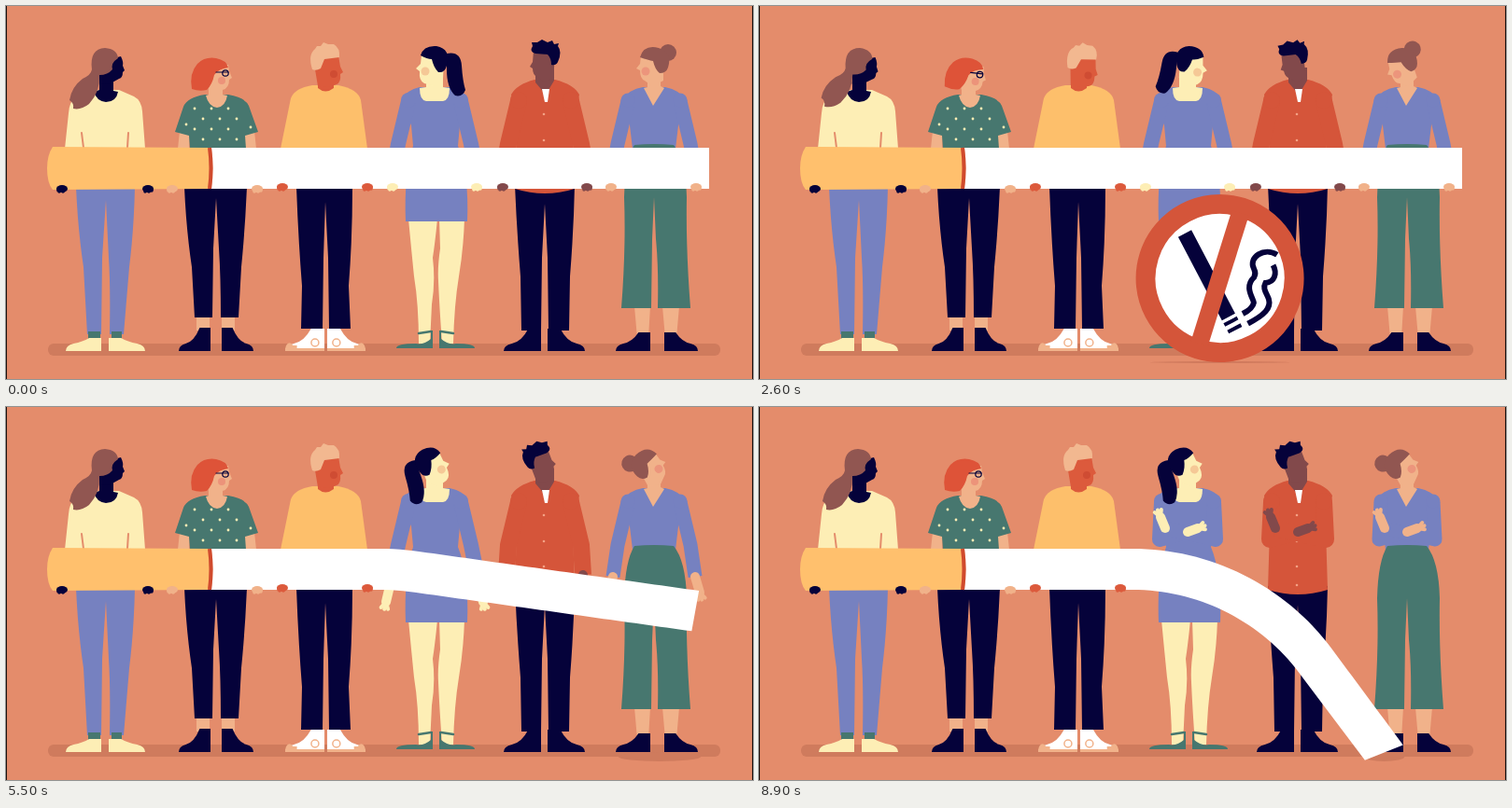
Animation of 800 by 400 pixels, one loop 9 s. Source, as an HTML page:

```html
<!DOCTYPE html>
<html lang="en">
<head>
<meta charset="utf-8">
<title>Letting go of smoking</title>
<style>
  html, body { margin: 0; width: 100%; height: 100%; overflow: hidden; background: #e48c6b; }
  svg { display: block; width: 100%; height: 100%; }
</style>
</head>
<body>
<svg id="stage" viewBox="0 0 800 400">
  <rect width="800" height="400" fill="#e48c6b"/>
  <rect x="45" y="362" width="720" height="13" rx="6" fill="#cf7b5d"/>
  <ellipse id="tipShade" fill="#cf7b5d"/>
  <ellipse id="signShade" fill="#b9664e"/>
  <g id="people"></g>

  <path id="paper" fill="#fff"/>
  <path d="M50 151Q44 160 44 174Q44 190 50 197L218 196V152Z" fill="#ffc06d"/>
  <path d="M218 152Q221 174 218 196" fill="none" stroke="#d04a2d" stroke-width="4"/>
  <g id="grips"></g>

  <g id="sign">
    <circle r="79.5" fill="#fff" stroke="#d4553a" stroke-width="21"/>
    <path d="M-60 3H41V19H-60ZM44.500 3H48.500V19H44.500ZM53 3H57V19H53Z" fill="#05023a"/>
    <g fill="none" stroke="#05023a" stroke-width="6">
      <path d="M6 -66C-8 -58 -6 -37 8 -37C12 -37 14 -36 16 -33C20 -18 36 -22 40 -20C44 -17 45 -12 45 -4"/>
      <path d="M14 -57C24 -57 31 -50 27 -41C31 -35 37 -37 44 -36C54 -34 57 -24 57 -4"/>
    </g>
    <path d="M-52 -52L52 52" stroke="#d4553a" stroke-width="19"/>
  </g>
  <path d="M.5 0V400M799.500 0V400" stroke="#1d100d"/>
</svg>

<script>
const LOOP = 9000, STEP = 100;
const NAVY = '#05023a', LILAC = '#7681c0', CREAM = '#fdeeb5', TEAL = '#47776f',
      RED = '#d5553a', PEACH = '#f1b28a', BROWN = '#82494b', HAIR = '#915651',
      GOLD = '#fdbf6b', BACK = '#e48c6b';

const $ = id => document.getElementById(id);
const set = (el, attrs) => { for (const k in attrs) el.setAttribute(k, attrs[k]); };
const fill = (color, d) => `<path d="${d}" fill="${color}"/>`;
const line = (color, width, d) =>
  `<path d="${d}" fill="none" stroke="${color}" stroke-width="${width}" stroke-linecap="round"/>`;
const dot = (color, x, y, r) => `<circle cx="${x}" cy="${y}" r="${r}" fill="${color}"/>`;

// side view of a shoe standing on the ground
function shoe(heel, toe, top, color) {
  const at = p => heel + (toe - heel) * p;
  return fill(color, `M${heel} 370V${top}H${at(.34)}Q${at(.52)} 360 ${at(.78)} 362Q${toe} 364 ${toe} 370Z`);
}

function sneaker(heel, toe) {
  const mid = heel + (toe - heel) * .24;
  return shoe(heel, toe, 346, '#fff') +
    fill(PEACH, `M${heel} 367H${toe}V370H${heel}Z`) +
    shoe(toe - (toe - heel) * .3, toe, 364, PEACH) +
    `<circle cx="${mid}" cy="361" r="4" fill="none" stroke="${PEACH}" stroke-width="1.5"/>`;
}

function flat(heel, toe) {
  const d = Math.sign(toe - heel);
  return fill(TEAL, `M${heel} 367V348H${heel - d * 2}V367ZM${heel} 367V357Q${heel + d * 8} 364 ${heel + d * 16} 362Q${toe} 362 ${toe} 367Z`) +
    line(TEAL, 2.5, `M${heel} 349L${heel + d * 13} 351`);
}

function dots() {
  let out = '';
  for (let row = 0; row < 4; row++)
    for (let x = 202 + row % 2 * 9; x < 256; x += 18)
      out += dot(CREAM, x, 110 + row * 11, 1.4);
  return out + dot(CREAM, 193, 127, 1.4) + dot(CREAM, 262, 130, 1.4);
}

// heads are drawn looking right and turn around their pivot
const people = [
  { pivot: [108, 78], down: 6, skin: NAVY, grip: [60, 152, 196],
    body:
      fill(LILAC, 'M75 194H138Q137 240 132 280L126 352H111Q112 300 110 270L107 208L103 270L102 352H87L83 280Q77 240 75 194Z') +
      fill(TEAL, 'M88 349H101V358H88ZM113 349H124V358H113Z') +
      shoe(102, 64, 356, CREAM) + shoe(110, 149, 356, CREAM) +
      fill(CREAM, 'M93 90L76 97Q68 101 67 115L63 153H149L146 113Q145 101 137 97L121 90Z') +
      line(BACK, 2, 'M81 136L83 152M131 136L130 152') +
      fill(NAVY, 'M100 72H115V91L120 92Q118 103 107 103Q97 102 94 92L100 90Z'),
    head:
      fill(NAVY, 'M101 60L123 54Q126 60 125 64L127 69L125 71Q125 77 121 78L112 83L100 84Z') +
      fill(HAIR, 'M92 68Q89 46 106 45Q119 46 120 56Q112 61 114 68Q109 74 100 74Q101 92 89 105Q80 112 72 110Q73 104 68 101Q70 87 82 78Q91 74 92 68Z') },

  { pivot: [222, 86], down: 11, skin: PEACH, grip: [178, 269, 196],
    body:
      fill(NAVY, 'M191 194H258Q256 240 252 280L249 334H230Q230 290 228 260L225 206L222 260L221 334H202L199 280Q193 240 191 194Z') +
      fill(PEACH, 'M204 334H218V348H204ZM231 334H245V348H231Z') +
      shoe(219, 185, 345, NAVY) + shoe(231, 265, 345, NAVY) +
      fill(PEACH, 'M186 134H197L196 153H184ZM255 134H266L268 153H256Z') +
      fill(TEAL, 'M213 95Q194 98 190 108L181 135L196 139L197 153H257L256 139L270 135L260 107Q256 98 238 95Z') +
      dots() +
      fill(PEACH, 'M217 82H232V95L237 96Q235 108 226 109Q217 108 214 96L217 95Z'),
    head:
      fill(PEACH, 'M214 63L238 63L239 70L242 77L239 79Q239 88 232 90L217 90Z') +
      dot('#ec937a', 231, 80, 4) +
      fill('#de5338', 'M199 89Q196 72 205 62Q213 54 225 56Q236 58 238 66Q228 67 223 74Q221 84 215 90Q207 92 199 89Z') +
      line(NAVY, 1.2, 'M225 71H238') +
      `<circle cx="235" cy="72" r="3.2" fill="none" stroke="${NAVY}" stroke-width="1.2"/>` },

  { pivot: [342, 84], down: 14, skin: '#dc5a3c', grip: [296, 387, 194],
    body:
      fill(NAVY, 'M311 194H371Q371 250 367 300L369 346H346L345 270L342 210L340 270L339 346H316L317 300Q313 250 311 194Z') +
      sneaker(341, 299) + sneaker(344, 385) +
      fill(GOLD, 'M328 85Q309 88 305 99L294 153H387L380 101Q377 89 356 85Z') +
      fill('#dc5a3c', 'M334 70H351V88Q342 95 334 88Z'),
    head:
      fill('#dc5a3c', 'M333 55L356 53L358 65L361 71L358 73Q359 82 354 84L346 87L334 86L331 68Z') +
      dot('#cf4c33', 351, 73, 4) +
      fill('#f2b890', 'M328 68Q323 52 331 46L333 43L337 43L340 39L345 41L351 41Q358 45 357 55L341 57L337 67Q332 70 328 68Z') },

  { pivot: [459, 76], down: 7, side: 5, up: -20, flipAt: 2500, skin: CREAM, grip: [414, 504, 194],
    sleeve: [LILAC, 16], reach: [48, 192, 52, 209],
    body:
      fill(CREAM, 'M431 228H462Q460 250 457 270Q460 295 456 320L454 362H442Q442 320 437 290Q433 250 431 228ZM464 228H491Q490 260 485 290Q480 320 479 362H467Q464 320 463 295Q462 280 465 260Z') +
      flat(455, 418) + flat(466, 502) +
      fill(LILAC, 'M443 87Q429 90 423 101L434 128L436 150Q426 180 428 231H494Q496 180 484 150L486 128L495 101Q491 90 475 87Z') +
      fill(CREAM, 'M450 72H468V87L475 88Q475 101 468 102H450Q443 101 443 88L450 87Z'),
    head:
      fill(CREAM, 'M449 57L473 53L474 62L479 67L475 70Q476 80 470 83L459 86L450 78Z') +
      dot('#f5c896', 469, 70, 4.5) +
      fill(NAVY, 'M446 51Q431 48 430 64Q429 80 426 90Q429 98 437 96Q446 88 446 68Z') +
      fill(NAVY, 'M446 64Q441 46 457 43Q471 42 474 53Q467 57 462 57Q460 66 455 71Q448 72 446 64Z') },

  { pivot: [577, 78], down: 14, side: 8, up: -16, flipAt: 2700, skin: BROWN, grip: [532, 622, 194],
    sleeve: [RED, 18], reach: [41, 180, 42, 190],
    body:
      fill(NAVY, 'M545 192H609Q608 240 604 290L603 348H581L580 270L577 212L574 270L573 348H552L551 290Q547 240 545 192Z') +
      shoe(573, 533, 346, NAVY) + shoe(580, 620, 346, NAVY) +
      fill(RED, 'M566 79Q547 84 541 95L547 130L545 196Q577 206 609 196L607 130L614 95Q608 84 588 79Z') +
      fill(BROWN, 'M567 66H587V80L578 95L567 82Z') +
      fill('#fff', 'M574 89H582L580 103H577Z') +
      [116, 144, 171, 191].map(y => dot('#f3a184', 576, y, 1.3)).join(''),
    head:
      fill(BROWN, 'M566 54L589 48L590 60L593 65L590 67Q590 74 585 76L578 81L568 78Z') +
      fill(NAVY, 'M563 60Q558 49 563 43L562 40L567 41L569 37L574 39L580 36L585 39L591 39L590 43Q594 49 587 51L574 52Q570 56 570 63Q565 64 563 60Z') },

  { pivot: [694, 76], down: 22, side: 14, up: -29, flipAt: 3000, skin: PEACH, grip: [648, 739, 194],
    sleeve: [LILAC, 15], reach: [44, 182, 49, 199],
    body:
      fill(PEACH, 'M673 322H690L688 356H676ZM703 322H721L718 356H706Z') +
      shoe(690, 653, 350, NAVY) + shoe(705, 741, 350, NAVY) +
      fill(LILAC, 'M682 87Q667 89 661 101L668 128L671 153H717L720 128L727 101Q722 90 706 87Z') +
      fill(TEAL, 'M673 149Q694 147 715 149Q728 165 729 205Q728 260 733 324H698Q699 280 696 250L694 205L692 250L691 324H659Q664 260 662 205Q663 165 673 149Z') +
      fill(PEACH, 'M687 72H701V86L705 88L693 107L683 88L687 87Z'),
    head:
      fill(PEACH, 'M684 58L708 54L709 62L713 67L709 69Q709 78 704 80L696 86L684 80Z') +
      dot('#ec957c', 703, 70, 4.5) +
      dot(HAIR, 679, 50, 9) +
      fill(HAIR, 'M679 66Q674 50 689 45Q705 41 709 55Q700 58 695 59Q693 68 688 72Q681 72 679 66Z') }
];

// arm poses: elbow, wrist and knuckles, measured outward from the body's axis
const HELD = [39, 148, 43, 170, 43, 172];
const CROSSED = { '-1': [30, 142, 0, 134, -11, 130], '1': [30, 142, -24, 130, -29, 118] };
const RELEASE = 5200;

function build() {
  for (const p of people) {
    const arms = p.sleeve ? '<g class="arms"></g>' : '';
    $('people').insertAdjacentHTML('beforeend', `<g>${p.body}${arms}<g class="head">${p.head}</g></g>`);
    const g = $('people').lastElementChild;
    p.headEl = g.querySelector('.head');
    p.armsEl = g.querySelector('.arms');
    const [l, r, y] = p.grip;
    $('grips').insertAdjacentHTML('beforeend', '<g>' + [l, r].map((x, i) => {
      const d = i ? 1 : -1;
      return `<ellipse cx="${x}" cy="${y}" rx="6" ry="4" fill="${p.skin}"/>` +
        line(p.skin, 3.5, `M${x - 3} ${y + 2}V${y + 3}M${x + 1} ${y + 2}V${y + 3}M${x + d * 4} ${y}V${y + 2}`);
    }).join('') + '</g>');
    p.gripEl = $('grips').lastElementChild;
  }
}

const clamp = v => Math.max(0, Math.min(1, v));
const smooth = v => { v = clamp(v); return v * v * (3 - 2 * v); };
const mix = (a, b, p) => a + (b - a) * p;

// eased value through [time, value] stops
function track(t, stops) {
  let v = stops[0][1];
  for (let i = 1; i < stops.length; i++) {
    const [t0] = stops[i - 1], [t1, v1] = stops[i];
    v = mix(v, v1, smooth((t - t0) / (t1 - t0)));
  }
  return v;
}

function drawHead(p, t) {
  const [x, y] = p.pivot;
  const stops = [[400, 0], [800, p.down], [2300, p.down], [3000, p.side || 0]];
  if (p.sleeve) stops.push([4200, p.side], [4800, 0], [5000, 0], [5400, p.up]);
  const dir = p.sleeve && t < p.flipAt ? -1 : 1;
  set(p.headEl, { transform: `translate(${x} ${y}) scale(${dir} 1) rotate(${track(t, stops)}) translate(${-x} ${-y})` });
}

function drawArms(p, t) {
  const drop = smooth((t - RELEASE + 100) / 300), cross = smooth((t - 5700) / 600);
  const [color, width] = p.sleeve, cx = p.pivot[0];
  const hanging = [39, 148, ...p.reach];
  let sleeves = '', hands = '';
  for (const s of [-1, 1]) {
    const [ex, ey, wx, wy, hx, hy] = HELD.map((v, i) =>
      mix(mix(v, hanging[i], drop), CROSSED[s][i], cross)).map((v, i) => i % 2 ? v : cx + s * v);
    sleeves += `<path d="M${cx + s * 28} 102L${ex} ${ey}L${wx} ${wy}" fill="none" stroke="${color}"
      stroke-width="${width}" stroke-linejoin="round"/>` + dot(color, cx + s * 28, 101, width / 2);
    const a = Math.atan2(hy - wy, hx - wx);
    hands += line(p.skin, 10, `M${wx} ${wy}L${hx} ${hy}`);
    for (const turn of [-.5, 0, .5])
      hands += line(p.skin, 4, `M${hx} ${hy}l${8 * Math.cos(a + turn)} ${8 * Math.sin(a + turn)}`);
  }
  p.armsEl.innerHTML = sleeves + hands;
  p.gripEl.style.display = t < RELEASE ? '' : 'none';
}

// the paper is straight up to x = 400, then bends along an arc that grows;
// its cross-section leans a little further than its path
function drawPaper(t) {
  const q = clamp((t - 5150) / 904) ** 2;
  const bend = .93 * q, arc = .02 + .63 * q;
  const length = 353 - 3 * q - 12 * Math.sin(Math.PI * Math.sqrt(q));
  const n = 50, top = [], bottom = [];
  let x = 400, y = 174;
  for (let i = 0; i <= n; i++) {
    const a = bend * Math.min(1, i / n / arc) * (1 + .28 * i / n);
    const dx = 22 * Math.sin(a), dy = 22 * Math.cos(a);
    top.push(`${x + dx} ${y - dy}`);
    bottom.unshift(`${x - dx} ${y + dy}`);
    const b = bend * Math.min(1, (i + .5) / n / arc);
    if (i < n) { x += length / n * Math.cos(b); y += length / n * Math.sin(b); }
  }
  set($('paper'), { d: `M220 152L${top.join('L')}L${bottom.join('L')}L220 196Q223 174 220 152Z` });
  set($('tipShade'), { cx: x - 45 * (1 - q), cy: 375, rx: q ? mix(48, 22, q) : 0, ry: 5 });
}

// bounces share one gravity: [time of the highest point, height]
const HOPS = [[48, 382], [1000, 97], [1536, 45], [1900, 21], [2149, 9.7]];
const GRAVITY = 97 / 319 ** 2;

function drawSign(t) {
  const h = Math.max(0, ...HOPS.map(([at, top]) => top - GRAVITY * (t - at) ** 2));
  const roll = 281 * Math.max(0, (t - 2200) / 1000) ** 1.2;
  const x = 400 + roll, near = Math.min(1, h / 97);
  set($('sign'), { transform: `translate(${x} ${292 - h}) rotate(${roll / 86 * 180 / Math.PI})` });
  set($('signShade'), {
    cx: x, cy: 382 + 12 * near ** .35, rx: 75 + 15 * near ** .4, ry: .7 + 5.3 * near,
    opacity: .6 * clamp(1 - (h - 97) / 285)
  });
  $('sign').style.display = $('signShade').style.display = x < 900 && t > 0 ? '' : 'none';
}

function draw(t) {
  for (const p of people) {
    drawHead(p, t);
    if (p.sleeve) drawArms(p, t);
  }
  drawPaper(t);
  drawSign(t);
}

build();
const start = performance.now();
let shown = -1;
function tick() {
  const t = Math.floor((performance.now() - start) % LOOP / STEP) * STEP;
  if (t !== shown) draw(shown = t);
  requestAnimationFrame(tick);
}
tick();
</script>
</body>
</html>
```
